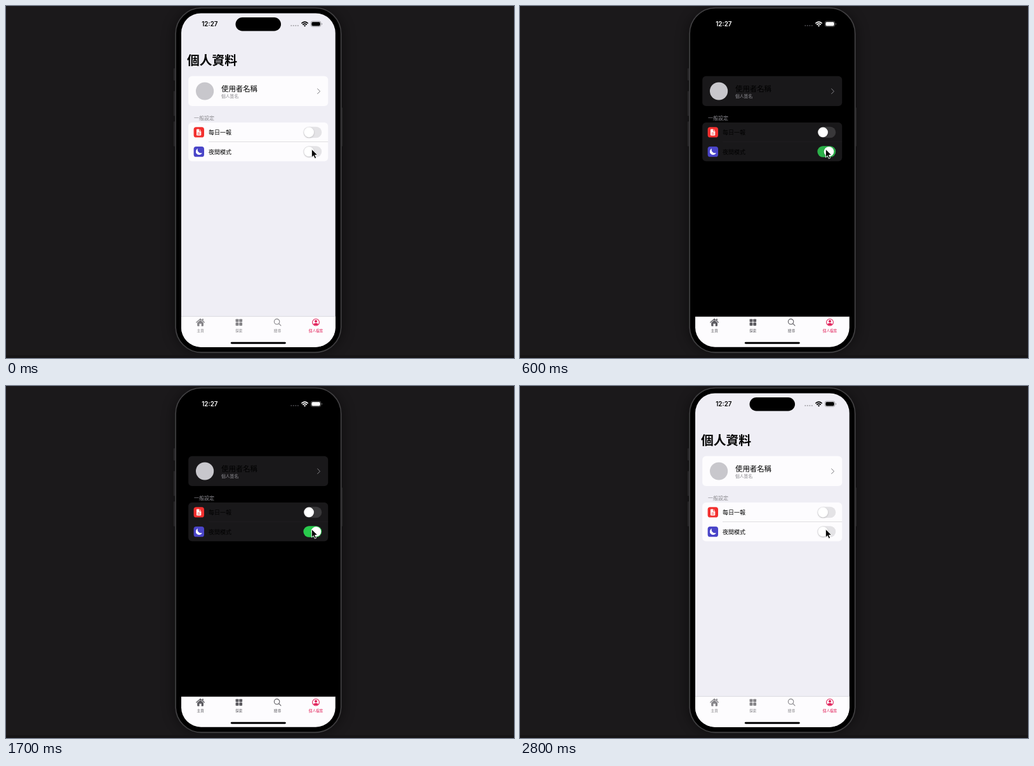
Recreate the animation shown at these times as an HTML page. Size 800 by 556 pixels, loop 2.9 s.

```html
<!DOCTYPE html>
<html lang="zh-Hant">
<head>
<meta charset="utf-8">
<style>
html, body { margin: 0; width: 100%; height: 100%; overflow: hidden; background: #1b191b; }
svg {
  display: block; width: 800px; height: 556px;
  font-family: "Noto Sans CJK TC", "Noto Sans CJK", sans-serif;
  --page: #efeef5; --card: #fdfcfe; --track: #e4e3e6; --on: #28a54b;
  --status: #000; --dots: #a9a8ae; --note: #8b8a8f; --line: #d3d2d6;
  --tab: #858488; --chevron: #77767b; --shell: #fdfcfe;
}
svg.dark {
  --page: #000; --card: #19181a; --track: #39383a; --on: #28cb4c;
  --status: #fff; --dots: #464549; --note: #8d8c92; --line: #201f22;
  --tab: #5c5b60; --chevron: #87868b;
}
.track { fill: var(--track); }
.note { fill: var(--note); }
.tab { fill: var(--tab); }
.active { fill: #e2245c; }
.stroke { fill: none; stroke-linecap: round; stroke-linejoin: round; }
.row { font-size: 9px; font-weight: 500; }
.label { font-size: 5.6px; text-anchor: middle; }
</style>
</head>
<body>
<svg id="stage" viewBox="0 0 800 556">
  <defs>
    <clipPath id="screen"><rect x="276" y="11.5" width="242.7" height="527.2" rx="31"/></clipPath>
    <filter id="soft" x="-20%" y="-20%" width="140%" height="140%"><feGaussianBlur stdDeviation="10"/></filter>
    <filter id="lift" x="-30%" y="-30%" width="160%" height="160%">
      <feDropShadow dx="0" dy=".8" stdDeviation=".8" flood-opacity=".25"/>
    </filter>
  </defs>
  <rect width="800" height="556" fill="#1b191b"/>

  <!-- Phone body -->
  <rect x="264" y="4" width="267" height="544" rx="44" fill="#000" opacity=".42" filter="url(#soft)"/>
  <rect y="551.5" width="800" height="5" fill="#161416"/>
  <g fill="#29282a" stroke="#111" stroke-width=".6">
    <rect x="263.5" y="98" width="5" height="20" rx="1"/>
    <rect x="263.5" y="134" width="5" height="40" rx="1"/>
    <rect x="263.5" y="182" width="5" height="40" rx="1"/>
    <rect x="526" y="160" width="4.5" height="62" rx="1"/>
  </g>
  <rect x="265.8" y="1.8" width="263.2" height="546.6" rx="42" fill="#252426"/>
  <rect x="267.3" y="3.2" width="260.2" height="543.8" rx="40.5" fill="#000" stroke="#454446" stroke-width="1.3"/>

  <g clip-path="url(#screen)">
    <rect x="275" y="11" width="245" height="529" fill="var(--page)"/>

    <!-- Status bar -->
    <rect x="361.5" y="18" width="71.5" height="21.5" rx="10.75"/>
    <g fill="var(--status)">
      <text x="308.2" y="32" font-size="9.9" font-weight="600" font-family="Inter, sans-serif">12:27</text>
      <rect x="481.3" y="25.2" width="13.4" height="6.3" rx="1.7"/>
      <path d="M497 27v2.8q.9-.5.9-1.4t-.9-1.4z" opacity=".5"/>
      <path d="M470.5 32.7l1.8-1.9q-1.8-1.3-3.6 0z"/>
    </g>
    <rect x="480.1" y="24" width="15.8" height="8.7" rx="2.7" fill="none" stroke="var(--status)" stroke-width=".7" opacity=".4"/>
    <path class="stroke" stroke="var(--status)" stroke-width="1.5" stroke-linecap="butt" d="M465.8 27.1q4.7-4 9.4 0M467.6 29.3q2.9-2.4 5.8 0"/>
    <g fill="var(--dots)">
      <circle cx="449.3" cy="31" r="1.1"/><circle cx="452.8" cy="31" r="1.1"/>
      <circle cx="456.3" cy="31" r="1.1"/><circle cx="459.8" cy="31" r="1.1"/>
    </g>

    <text x="285" y="93" font-size="19.8" font-weight="700">個人資料</text>

    <!-- Profile card -->
    <rect x="287.2" y="110.8" width="220" height="47.2" rx="5.6" fill="var(--card)"/>
    <circle cx="313.1" cy="134.5" r="14.1" fill="#c8c7cc"/>
    <text x="339" y="135.4" font-size="11.4" font-weight="500">使用者名稱</text>
    <text class="note" x="339" y="145" font-size="6.8">個人簽名</text>
    <path class="stroke" stroke="var(--chevron)" stroke-width="1" d="M490.6 130.8l3.9 3.9-3.9 3.9"/>

    <!-- Settings -->
    <text class="note" x="296" y="179.6" font-size="8">一般設定</text>
    <rect x="287.2" y="184" width="220" height="61.2" rx="5.6" fill="var(--card)"/>
    <path d="M319 214.5H507.2" stroke="var(--line)" stroke-width=".7"/>

    <rect x="295.6" y="191.2" width="16.4" height="16.4" rx="3.9" fill="#f2302f"/>
    <path fill="#fff" d="M300.9 194.5h3.1v3.5h3.3v5.6q0 .9-.9.9h-5.5q-.9 0-.9-.9v-8.2q0-.9.9-.9zM304.8 194.7l2.4 2.5h-2.4z"/>
    <path stroke="#f2302f" stroke-width=".8" d="M301.5 200.3h4.2M301.5 202.4h4.2"/>
    <text class="row" x="319" y="202.9">每日一報</text>
    <rect class="track" x="468.4" y="190.7" width="28.8" height="17.5" rx="8.75"/>
    <circle cx="477.1" cy="199.4" r="7.8" fill="#fff" filter="url(#lift)"/>

    <rect x="295.6" y="221.9" width="16.4" height="16.4" rx="3.9" fill="#4a45c8"/>
    <path fill="#fff" d="M302.1 225.1a5.2 5.2 0 1 0 6.8 6.8a5.2 5.2 0 0 1-6.8-6.8z"/>
    <text class="row" x="319" y="233.5">夜間模式</text>
    <rect class="track" x="468.4" y="221.3" width="28.8" height="17.5" rx="8.75"/>
    <rect id="glow" x="468.4" y="221.3" width="28.8" height="17.5" rx="8.75" fill="var(--on)"/>
    <circle id="knob" cx="477.1" cy="230" r="7.8" fill="#fff" filter="url(#lift)"/>

    <!-- Tab bar -->
    <rect x="275" y="490.5" width="245" height="50" fill="var(--shell)"/>
    <path d="M275 490.3H520" stroke="var(--line)" stroke-width=".7"/>
    <g class="tab">
      <path class="stroke" stroke="var(--tab)" stroke-width="1.3" d="M299.9 499.8l6.2-5.6 6.2 5.6"/>
      <path d="M306.1 496l4.9 4.4v4.4q0 .9-.9.9h-2.4v-4h-3.2v4h-2.4q-.9 0-.9-.9v-4.4zM309 494h1.8v3.2l-1.8-1.6z"/>
      <rect x="361.6" y="494.4" width="4.8" height="4.8" rx=".9"/>
      <rect x="367.3" y="494.4" width="4.8" height="4.8" rx=".9"/>
      <rect x="361.6" y="500.1" width="4.8" height="4.8" rx=".9"/>
      <rect x="367.3" y="500.1" width="4.8" height="4.8" rx=".9"/>
      <path class="stroke" stroke="var(--tab)" stroke-width="1.1" d="M422.4 498.6a4.2 4.2 0 1 0 8.4 0a4.2 4.2 0 1 0-8.4 0M429.7 501.7l3.2 3.2"/>
      <text class="label" x="306.2" y="515.1">主頁</text>
      <text class="label" x="366.8" y="515.1">探索</text>
      <text class="label" x="427.4" y="515.1">搜尋</text>
    </g>
    <g class="active">
      <circle cx="488" cy="499.6" r="5.4" fill="none" stroke="#e2245c" stroke-width="1.1"/>
      <circle cx="488" cy="498" r="2.1"/>
      <path d="M484.2 502.8q.8-2 3.8-2t3.8 2q-1.5 1.5-3.8 1.5t-3.8-1.5z"/>
      <text class="label" x="488" y="515.1" font-weight="500">個人檔案</text>
    </g>
    <rect x="353.9" y="530.8" width="86.8" height="2.9" rx="1.45"/>
  </g>

  <path d="M481.3 226v13.2l3-2.8 2 4.7 2.3-1-2-4.6h4.1z" stroke="#fff" stroke-width=".9" stroke-linejoin="round"/>
</svg>
<script>
const LOOP = 2900, STEP = 100, DARK_FROM = 600, DARK_TO = 1800;
const [stage, knob, glow] = ["stage", "knob", "glow"].map(id => document.getElementById(id));

const ease = x => {
  x = Math.min(1, Math.max(0, x));
  return x * x * (3 - 2 * x);
};

function draw(now) {
  const t = Math.floor(now % LOOP / STEP) * STEP;
  const on = ease((t - 500) / 135) - ease((t - 1740) / 210);
  stage.classList.toggle("dark", t >= DARK_FROM && t < DARK_TO);
  knob.setAttribute("cx", 477.1 + 11.3 * on);
  glow.setAttribute("opacity", on);
}

const start = performance.now();
function tick() {
  draw(performance.now() - start);
  requestAnimationFrame(tick);
}
tick();
</script>
</body>
</html>
```
